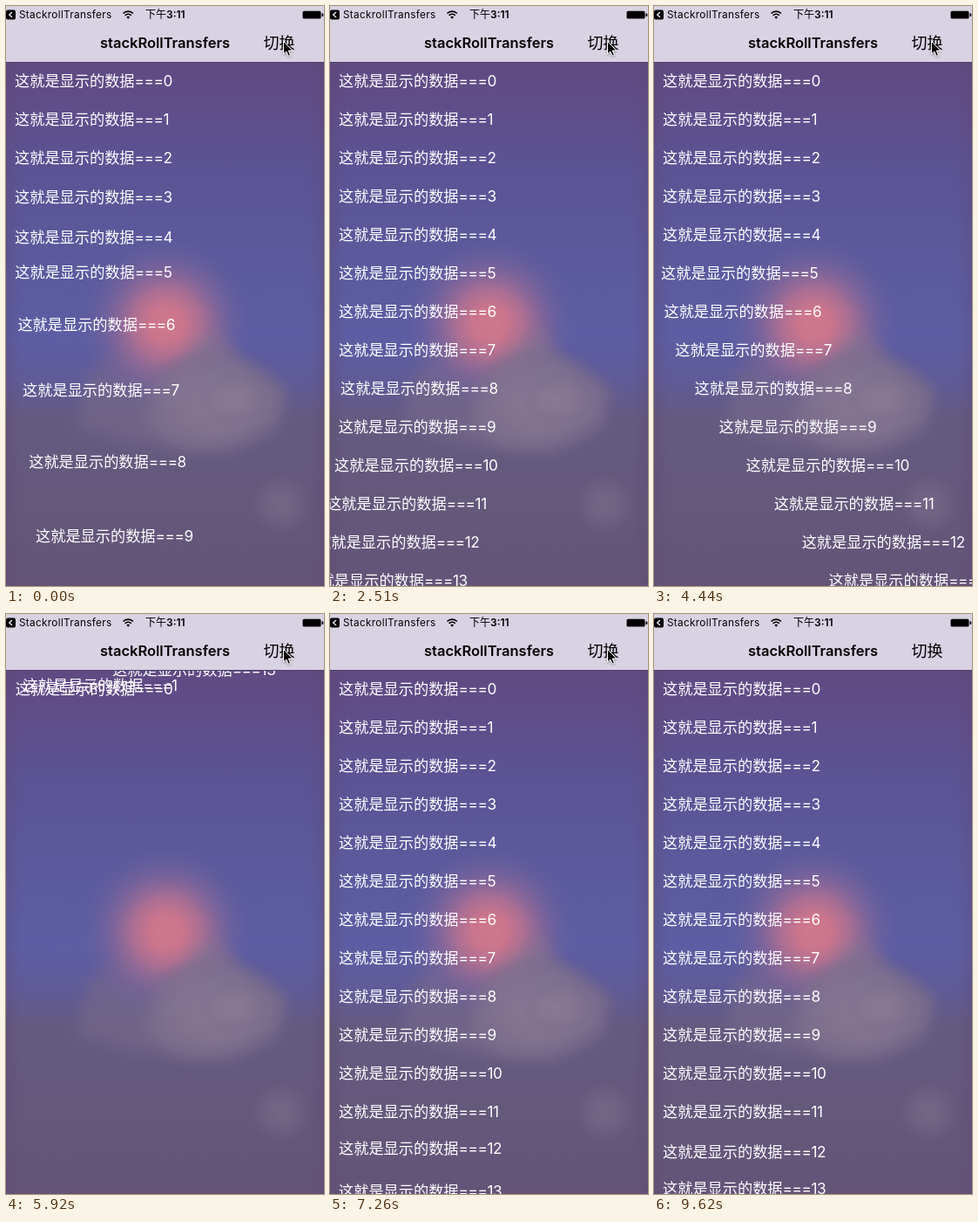
An HTML page for the animation above (9720 ms loop, 365 by 664 pixels).

```html
<!DOCTYPE html>
<html lang="zh">
<head>
<meta charset="utf-8">
<title>stackRollTransfers</title>
<style>
  html, body { margin: 0; width: 100%; height: 100%; overflow: hidden; background: #5d5489; }
  svg { display: block; width: 100vw; height: 100vh; }
  text { font-family: Inter, "Noto Sans CJK SC", "Noto Sans CJK", sans-serif; white-space: pre; }
  #rows text { font-size: 17.2px; fill: #fff; }
  #rows tspan { letter-spacing: -.4px; }
</style>
</head>
<body>
<svg viewBox="0 0 365 664">
  <defs>
    <linearGradient id="sky" x1="0" y1="64" x2="0" y2="664" gradientUnits="userSpaceOnUse">
      <stop offset="0" stop-color="#604a82"/>
      <stop offset=".1" stop-color="#5f4e8b"/>
      <stop offset=".2" stop-color="#5b5394"/>
      <stop offset=".38" stop-color="#5c5a9d"/>
      <stop offset=".53" stop-color="#5d5da3"/>
      <stop offset=".61" stop-color="#605b98"/>
      <stop offset=".68" stop-color="#645a80"/>
      <stop offset=".85" stop-color="#64587b"/>
      <stop offset="1" stop-color="#635478"/>
    </linearGradient>
    <linearGradient id="edge">
      <stop offset="0" stop-color="#5d4770" stop-opacity=".3"/>
      <stop offset=".05" stop-color="#5d4770" stop-opacity="0"/>
      <stop offset=".95" stop-color="#5d4770" stop-opacity="0"/>
      <stop offset="1" stop-color="#5d4770" stop-opacity=".3"/>
    </linearGradient>
    <radialGradient id="glow">
      <stop offset="0" stop-color="#d0788c"/>
      <stop offset=".2" stop-color="#ca758d"/>
      <stop offset=".4" stop-color="#b27092" stop-opacity=".92"/>
      <stop offset=".57" stop-color="#946a97" stop-opacity=".75"/>
      <stop offset=".77" stop-color="#78639a" stop-opacity=".5"/>
      <stop offset="1" stop-color="#69609e" stop-opacity="0"/>
    </radialGradient>
    <radialGradient id="mist">
      <stop offset="0" stop-color="#8d7d97"/>
      <stop offset=".5" stop-color="#857692" stop-opacity=".8"/>
      <stop offset=".8" stop-color="#786b8b" stop-opacity=".45"/>
      <stop offset="1" stop-color="#6c6189" stop-opacity="0"/>
    </radialGradient>
    <filter id="soft" x="-20%" y="-20%" width="140%" height="140%"><feGaussianBlur stdDeviation="9"/></filter>
    <filter id="drop" x="-50%" y="-50%" width="200%" height="200%">
      <feDropShadow dx="0" dy="1" stdDeviation=".8" flood-opacity=".4"/>
    </filter>
  </defs>

  <rect width="365" height="664" fill="url(#sky)"/>
  <path d="M80 480 95 420 145 390 225 345 262 400 325 440 312 485 250 515 140 500Z" fill="#74688a" opacity=".7" filter="url(#soft)"/>
  <circle cx="184" cy="364" r="98" fill="url(#glow)"/>
  <path d="M160 480 172 430 236 372 268 408 314 440 305 475 250 500 200 505Z" fill="#83748f" opacity=".65" filter="url(#soft)"/>
  <ellipse cx="240" cy="454" rx="90" ry="66" fill="url(#mist)" opacity=".65"/>
  <ellipse cx="262" cy="450" rx="42" ry="32" fill="url(#mist)" opacity=".55"/>
  <ellipse cx="315" cy="570" rx="36" ry="36" fill="url(#mist)" opacity=".38"/>
  <rect width="365" height="664" fill="url(#edge)"/>

  <g id="rows"></g>

  <rect width="365" height="64" fill="#d9d2e3"/>
  <rect y="64" width="365" height="1" fill="#4d3e68"/>
  <rect x="0" y="4.5" width="11" height="11" rx="2" fill="#000"/>
  <path d="M7 7 3.8 10 7 13" fill="none" stroke="#e4deec" stroke-width="1.5"/>
  <text x="15" y="14" font-size="11.8" letter-spacing=".3">StackrollTransfers</text>
  <path d="M134.5 8.5a8.2 8.2 0 0 1 11.4 0M136.7 10.9a5 5 0 0 1 7 0" fill="none" stroke="#000" stroke-width="1.7"/>
  <path d="M138.3 12.7a2.7 2.7 0 0 1 3.8 0L140.2 14.8Z"/>
  <text x="160" y="14.3" font-size="12" font-weight="400">下午<tspan font-weight="600">3:11</tspan></text>
  <rect x="340.5" y="5.8" width="21" height="8.8" rx="1.6"/>
  <path d="M362.5 8.5h.8a1 1 0 0 1 1 1v1.5a1 1 0 0 1-1 1h-.8Z"/>
  <text x="182.5" y="48" font-size="16.5" font-weight="600" text-anchor="middle">stackRollTransfers</text>
  <text x="295.5" y="48.5" font-size="18">切换</text>
  <path id="cursor" d="M318.5 40.5v14.5l3.3-3 2.3 5.3 2.4-1-2.3-5.2h4.6Z" stroke="#fff" stroke-width="1" filter="url(#drop)"/>
</svg>

<script>
const LOOP = 9720, STEP = 148, COUNT = 14, CURSOR_OFF = 8400;

// Each run throws every row to (dx, dy), then lets it travel home.
const runs = [
  { start: -1066, dx: 138, dy: 732 },
  { start: 1048, dx: -372, dy: 0 },
  { start: 3283, dx: 600, dy: 0 },
  { start: 5350, dx: 138, dy: -732 },
  { start: 7697, dx: 138, dy: 732 }
];

const layer = document.getElementById('rows');
const cursor = document.getElementById('cursor');
const rows = Array.from({ length: COUNT }, (_, i) => {
  const make = name => document.createElementNS('http://www.w3.org/2000/svg', name);
  const row = make('text'), tail = make('tspan');
  tail.textContent = '===' + i;
  row.append('这就是显示的数据', tail);
  layer.append(row);
  return row;
});

const clamp = v => Math.min(1, Math.max(0, v));
const mix = (a, b, k) => a + (b - a) * k;
const smooth = k => k * k * (3 - 2 * k);

// cubic-bezier(.42, 0, .58, 1), solved by bisection
function easeInOut(x) {
  let lo = 0, hi = 1;
  for (let n = 0; n < 24; n++) {
    const u = (lo + hi) / 2, v = 1 - u;
    const bx = 1.26 * u * v * v + 1.74 * u * u * v + u * u * u;
    if (bx < x) lo = u; else hi = u;
  }
  return smooth((lo + hi) / 2);
}

// Small wobbles after arrival, as pixels along the direction of the throw
function wobbleX(late) {
  return late > 0 && late < 140 ? -2 * Math.sin(Math.PI * late / 140) : 0;
}

function wobbleY(late) {
  if (late <= 0) return -3;
  return late < 45 ? mix(-3, 2.4, smooth(late / 45))
                   : mix(2.4, 0, smooth(clamp((late - 45) / 185)));
}

function offset(run, i, time) {
  const age = time - run.start;
  const span = 600 + 100 * i;
  const late = age - span;
  const left = 1 - easeInOut(clamp(age / span));
  let x = run.dx * left, y = run.dy * left;
  if (run.dy) y += Math.sign(run.dy) * wobbleY(late) * (1 - left);
  else x += Math.sign(run.dx) * wobbleX(late);
  return [x, y];
}

function draw(ms) {
  // The screen refreshes at a slow, fixed rate
  const time = Math.floor((ms % LOOP + 12) / STEP) * STEP;
  const run = runs.filter(r => r.start <= time).pop();
  rows.forEach((row, i) => {
    const [x, y] = offset(run, i, time);
    row.setAttribute('x', (10 + x).toFixed(2));
    row.setAttribute('y', (92.3 + 44 * i + y).toFixed(2));
  });
  cursor.style.display = time < CURSOR_OFF ? '' : 'none';
}

const begin = performance.now();
function tick() {
  draw(performance.now() - begin);
  requestAnimationFrame(tick);
}
tick();
</script>
</body>
</html>
```
